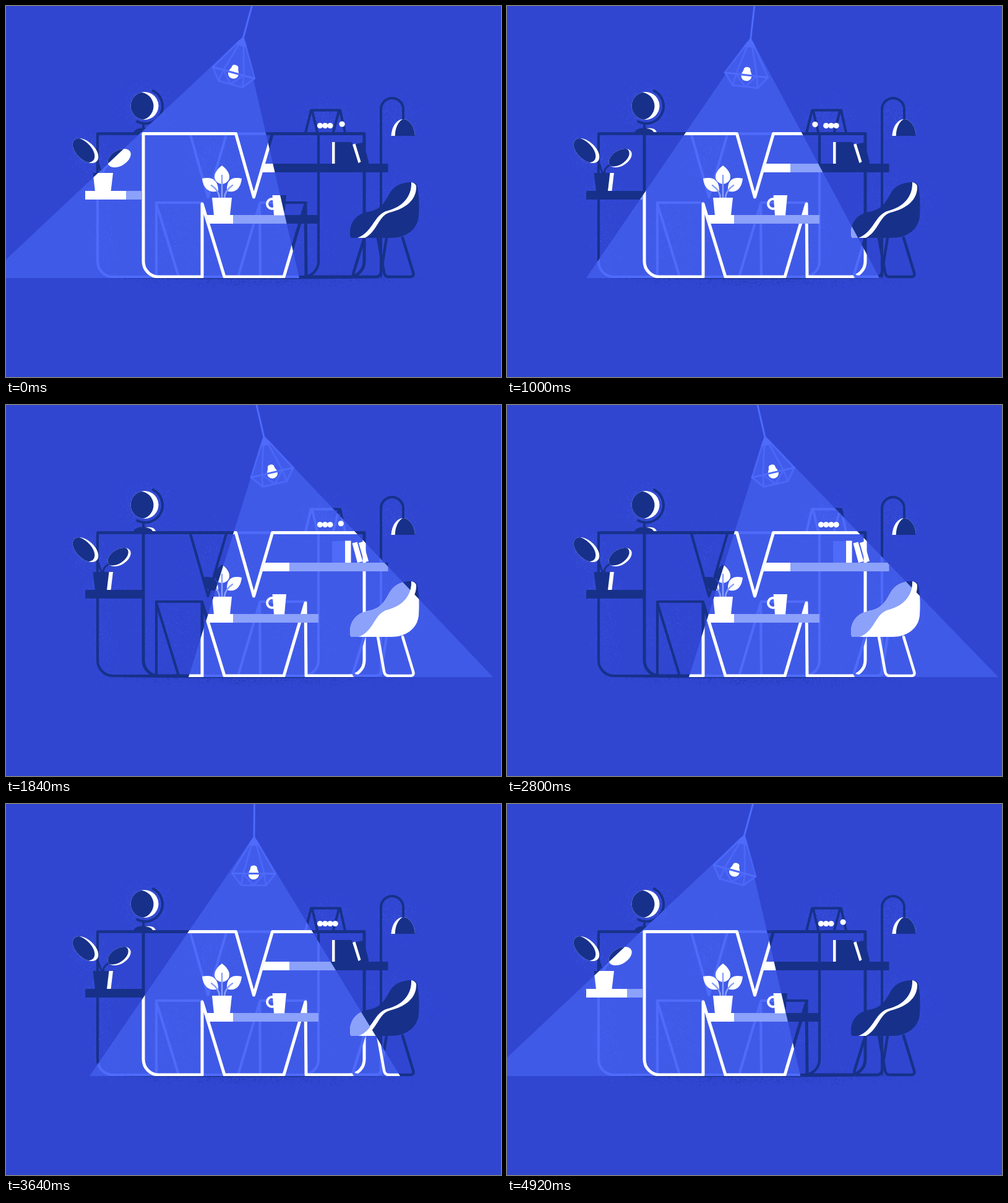
Animation, 800 px wide and 600 px high, one loop 4960 ms. Source, as an HTML page with a canvas:

```html
<!DOCTYPE html>
<html lang="en">
<head>
<meta charset="utf-8">
<title>Swinging lamp</title>
<style>
html, body { margin: 0; width: 100%; height: 100%; overflow: hidden; background: #3046d1; }
canvas { display: block; width: 800px; height: 600px; }
</style>
</head>
<body>
<canvas id="stage" width="800" height="600"></canvas>
<script>
const W = 800, H = 600, LOOP = 4960, STEP = 40, FLOOR = 440;
const BG = '#3046d1', DARK = '#17318a', BEAM = '#405ae8', GLOW = '#4f6bfa', PALE = '#8ba1fa', WHITE = '#fff';
const ctx = document.getElementById('stage').getContext('2d');

// time, beam left and right on the floor, lamp tilt in degrees
const KEYS = [
  [0, -32, 474, 15.3], [560, 20, 506, 12.8], [1000, 128, 602, 6.5], [1120, 160, 632, 4],
  [1680, 272, 760, -10.5], [1840, 295, 787, -13], [2320, 331, 828, -15.6], [2800, 294, 794, -13],
  [3360, 189, 689, -4.4], [3640, 135, 637, 0.5], [3920, 84, 587, 5.2], [4280, 26, 528, 9.6], [4480, 1, 503, 12.2]
];

function key(i) {
  const n = KEYS.length, k = KEYS[(i + n) % n];
  return [k[0] + Math.floor(i / n) * LOOP, ...k.slice(1)];
}

function slope(i, col) {
  const a = key(i - 1), b = key(i), c = key(i + 1);
  const p = (b[col] - a[col]) / (b[0] - a[0]), q = (c[col] - b[col]) / (c[0] - b[0]);
  return p * q <= 0 ? 0 : 2 * p * q / (p + q);
}

function valueAt(t, col) {
  let i = KEYS.length - 1;
  while (KEYS[i][0] > t) i--;
  const a = key(i), b = key(i + 1), d = b[0] - a[0], u = (t - a[0]) / d;
  const s = u * u * (3 - 2 * u);
  return a[col] * (1 - s) + b[col] * s
    + d * u * (1 - u) * ((1 - u) * slope(i, col) - u * slope(i + 1, col));
}

function fill(c, path, color) {
  c.fillStyle = color;
  c.fill(new Path2D(path));
}

function line(c, path, color, width) {
  c.strokeStyle = color;
  c.lineWidth = width;
  c.stroke(new Path2D(path));
}

function oval(c, x, y, rx, ry, turn, color) {
  c.fillStyle = color;
  c.beginPath();
  c.ellipse(x, y, rx, ry, turn, 0, 7);
  c.fill();
}

// A disc with a bright crescent left by a shifted second disc
function crescent(c, x, y, rx, ry, turn, dx, dy, color) {
  c.save();
  c.beginPath();
  c.ellipse(x, y, rx, ry, turn, 0, 7);
  c.clip();
  c.fillStyle = WHITE;
  c.fillRect(x - 40, y - 40, 80, 80);
  oval(c, x + dx, y + dy, rx, ry, turn, color);
  c.restore();
}

function randomizer(seed) {
  return () => (seed = (seed * 16807) % 2147483647) / 2147483647;
}

function grain(c, lit) {
  const rnd = randomizer(71);
  const spread = () => rnd() + rnd() + rnd() - 1.5;
  const spray = (x, y, rx, ry, n, color) => {
    c.fillStyle = color;
    for (let i = 0; i < n; i++) c.fillRect(x + spread() * rx, y + spread() * ry, 1, 1);
  };
  const light = lit ? 'rgba(88,116,255,.45)' : 'rgba(74,100,245,.5)';
  spray(226, 164, 38, 34, 750, light);
  spray(132, 240, 32, 36, 550, light);
  spray(155, 300, 35, 18, 400, light);
  spray(517, 182, 42, 34, 550, light);
  spray(630, 180, 36, 40, 450, light);
  spray(628, 325, 54, 48, 900, light);
  spray(330, 245, 50, 55, 500, light);
  spray(270, 375, 60, 65, 700, light);
  spray(480, 370, 60, 60, 500, light);
  spray(160, 380, 22, 60, 350, light);
  if (!lit) spray(405, 443, 230, 11, 1000, 'rgba(23,49,138,.4)');
}

function letter(c, x, color, width) {
  c.save();
  c.translate(x, 0);
  line(c, 'M0 206.5H149.5L178.5 309L208.5 206.5H357V413A25 25 0 0 1 332 438H263L262 320L227 438H131L95 320V438H25A25 25 0 0 1 0 413Z', color, width);
  c.restore();
}

function frames(c, lit) {
  const back = lit ? GLOW : DARK;
  letter(c, 148, back, 4.2);
  line(c, 'M148 206.5H579M243 318H317M411 318H485M172 438H246M482 438H556', back, 4.2);
  line(c, 'M606 437V167A18 18 0 0 1 642 167V182', back, 4);
  line(c, 'M484 205L493 168.5H540L548 205M495 170L503 204M538 170L529 204', back, 4);
  letter(c, 222, lit ? WHITE : DARK, 5);
}

function globe(c) {
  c.strokeStyle = DARK;
  c.lineWidth = 4;
  c.beginPath();
  c.arc(225, 162, 28, -1.1, 2.05);
  c.stroke();
  crescent(c, 224, 161.5, 22.5, 22.5, 0, -8, 0.5, DARK);
  fill(c, 'M220 188H224V198H220ZM206 205Q208 197 224 197Q239 197 242 205Z', DARK);
  fill(c, 'M225 198Q239 196 242 204H237Q235 199 225 198Z', WHITE);
}

function floorLamp(c) {
  c.save();
  c.clip(new Path2D('M622.500 210A19.300 29 0 0 1 661 210Z'));
  c.fillStyle = WHITE;
  c.fillRect(620, 178, 45, 34);
  oval(c, 648, 210, 19.3, 29, 0, DARK);
  c.restore();
}

function shelf(c, path, split, y, lit) {
  fill(c, path, lit ? PALE : DARK);
  if (!lit) return;
  c.save();
  c.clip(new Path2D(path));
  c.fillStyle = WHITE;
  c.fillRect(0, y, split, 15);
  c.restore();
}

function shelves(c, lit) {
  shelf(c, `M128 299H${lit ? 220 : 224}V313H128Z`, 194, 299, lit);
  shelf(c, 'M322.5 338H505V352H327Z', 367, 338, lit);
  shelf(c, 'M416.5 255H617.5V269H412.5Z', 458, 255, lit);
}

function leftPlant(c, lit) {
  line(c, 'M156 271C150 266 153 259 146 249M157 271C157 262 163 259 170 254', lit ? GLOW : DARK, 3);
  if (lit) {
    oval(c, 128, 234, 25, 14.5, 0.75, WHITE);
    oval(c, 183, 246, 20.5, 12.5, -0.55, WHITE);
  } else {
    crescent(c, 128.5, 234, 25, 14.5, 0.75, -6, -1, DARK);
    crescent(c, 183, 246, 20.5, 12.5, -0.55, -4, -1.5, DARK);
  }
  fill(c, 'M140.500 270H173L169.500 299.500H144Z', lit ? WHITE : DARK);
  if (!lit) fill(c, 'M166.500 270H173L169.500 299H163Z', WHITE);
}

function middlePlant(c, lit) {
  const body = lit ? WHITE : DARK, vein = lit ? PALE : DARK;
  fill(c, 'M349 258C356 263 361 270 361 276C361 283 356 287 349 288C342 287 337 283 337 276C337 270 342 263 349 258Z', body);
  fill(c, 'M317 279C331 276 343 280 343 299C331 303 319 298 317 279Z', body);
  fill(c, 'M381 279C367 276 356 280 357 299C368 303 379 298 381 279Z', body);
  line(c, 'M349 311V274M345 311Q345 299 332 290M353 311Q353 299 366 290', vein, 2.5);
  fill(c, 'M333 310H365L362 338.500H336Z', body);
}

function mug(c, lit) {
  const color = lit ? WHITE : DARK;
  c.strokeStyle = color;
  c.lineWidth = 4;
  c.beginPath();
  c.ellipse(430, 320, 8, 8, 0, 0, 7);
  c.stroke();
  fill(c, 'M430.500 306H453L450 338.500H433Z', color);
}

function books(c, lit) {
  if (lit) {
    fill(c, 'M527 220H548V255H527Z', GLOW);
    fill(c, 'M548 219.500H557.500V255H548ZM559.500 223.500L567.500 221.500L576.500 253L568 255ZM570 223L577 221L586 252.500L579 254.500Z', WHITE);
    return;
  }
  fill(c, 'M527 220H558L561 224L578 220.500L586 252V255H527Z', DARK);
  fill(c, 'M527 220H531.500V255H527ZM560 224L564.500 222.500L573.500 252L569.500 254Z', WHITE);
}

function chair(c, lit) {
  const color = lit ? WHITE : DARK;
  const front = 'M557 374C553 355 563 337 585 333C607 329 612 317 619 305C626 292 636 286 655 285';
  line(c, 'M579 375L562 430Q559 438 569 438H597Q605 438 606 431L615 375', lit ? GLOW : DARK, 4.5);
  line(c, 'M601 375L611 431Q612 438 619 438H653Q660 438 658 431L641 375', color, 4.5);
  fill(c, front + 'Q664 285 665 293C668 308 668 325 667 340C665 362 646 375 623 375H563Q558 375 557 374Z', color);
  fill(c, front + 'C656 309 640 325 617 331C594 337 596 365 570 375H563Q558 375 557 374Z', lit ? PALE : DARK);
  if (!lit) fill(c, 'M655 285Q661 286 663 291C664 314 645 328 620 334C602 339 600 365 580 375H568C594 365 594 337 617 331C640 325 656 309 655 285Z', WHITE);
}

function renderScene(lit) {
  const layer = document.createElement('canvas');
  layer.width = W;
  layer.height = H;
  const c = layer.getContext('2d');
  c.lineJoin = c.lineCap = 'round';
  c.fillStyle = lit ? BEAM : BG;
  c.fillRect(0, 0, W, H);
  grain(c, lit);
  if (!lit) fill(c, 'M165 440Q400 437 625 440Q400 443 165 440Z', DARK);
  frames(c, lit);
  if (!lit) {
    globe(c);
    floorLamp(c);
  }
  shelves(c, lit);
  leftPlant(c, lit);
  middlePlant(c, lit);
  mug(c, lit);
  books(c, lit);
  chair(c, lit);
  return layer;
}

const darkScene = renderScene(false), litScene = renderScene(true);

function drawCradle(t) {
  const swing = Math.cos(t / LOOP * 6 * Math.PI);
  const lift = Math.max(0, (Math.abs(swing) - 0.35) / 0.65);
  const shift = 11 * Math.sin(lift * Math.PI / 2);
  for (let i = 0; i < 4; i++) {
    const out = i === 3 && swing > 0 ? shift : i === 0 && swing < 0 ? -shift : 0;
    oval(ctx, 507.5 + i * 8.2 + out, 193.5 - out * out / 48, 4.6, 4.6, 0, WHITE);
  }
}

function drawLamp(tilt) {
  ctx.save();
  ctx.translate(401.5, -15);
  ctx.rotate(tilt);
  line(ctx, 'M0 0V68', GLOW, 3);
  ctx.translate(0, 67.5);
  fill(ctx, 'M0 -2L35 60L20 79H-20L-35 60Z', 'rgba(79,107,250,.12)');
  fill(ctx, 'M0 -2L9 15H-9Z', GLOW);
  line(ctx, 'M-4 7L-35 60L-20 79H20L35 60L4 7M-3 10L-17 60L-20 79M3 10L17 60L20 79M-17 60L0 79L17 60', 'rgba(79,107,250,.8)', 3);
  fill(ctx, 'M0 47C4 47 5.500 49 5.500 52C6 55 8.500 57 8.500 61C8.500 66 5 69.500 0 69.500C-5 69.500 -8.500 66 -8.500 61C-8.500 57 -6 55 -5.500 52C-5.500 49 -4 47 0 47Z', WHITE);
  line(ctx, 'M-35 60H35', GLOW, 3);
  ctx.restore();
}

function draw(now) {
  const t = Math.floor(now / STEP) * STEP % LOOP;
  const tilt = valueAt(t, 3) * Math.PI / 180;
  const apexX = 401.5 - 67.5 * Math.sin(tilt), apexY = -16 + 67.5 * Math.cos(tilt);
  ctx.lineJoin = ctx.lineCap = 'round';
  ctx.drawImage(darkScene, 0, 0);
  ctx.save();
  ctx.beginPath();
  ctx.moveTo(apexX, apexY);
  ctx.lineTo(valueAt(t, 2), FLOOR);
  ctx.lineTo(valueAt(t, 1), FLOOR);
  ctx.clip();
  ctx.drawImage(litScene, 0, 0);
  ctx.restore();
  drawCradle(t);
  drawLamp(tilt);
}

const start = performance.now();
function tick() {
  draw(performance.now() - start);
  requestAnimationFrame(tick);
}
tick();
</script>
</body>
</html>
```
